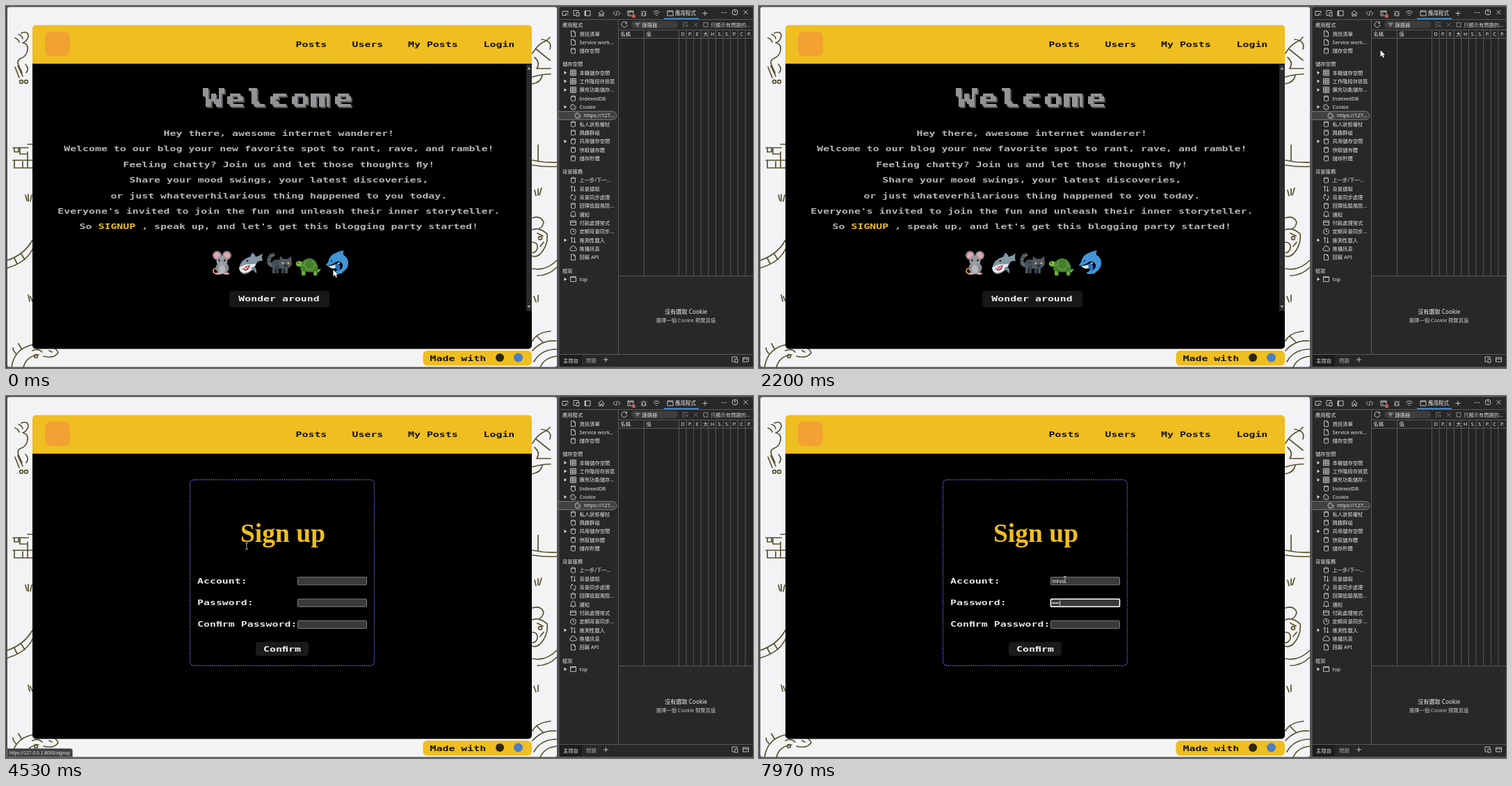
An HTML page with a canvas for the animation above (8000 ms loop, 1074 by 521 pixels).

```html
<!DOCTYPE html>
<html lang="zh-Hant">
<head>
<meta charset="utf-8">
<title>Blog sign up</title>
<style>
html, body { margin: 0; width: 100%; height: 100%; overflow: hidden; background: #555358; }
canvas { display: block; }
</style>
</head>
<body>
<canvas id="stage" width="1074" height="521"></canvas>
<script>
const ctx = document.getElementById('stage').getContext('2d');
const LOOP = 8000;
const UI = '"Noto Sans", "Noto Sans CJK TC", "Noto Sans CJK", sans-serif';
const MONO = '"DejaVu Sans Mono", monospace';
const ARIAL = '"Liberation Sans", sans-serif';
const ADVANCE = 8.96;
const YELLOW = '#efbe20';

// ---------- helpers ----------
function box(x, y, w, h, fill, r = 0, line, lw = 1) {
  ctx.beginPath();
  ctx.roundRect(x, y, w, h, r);
  if (fill) { ctx.fillStyle = fill; ctx.fill(); }
  if (line) { ctx.strokeStyle = line; ctx.lineWidth = lw; ctx.stroke(); }
}
function oval(x, y, rx, ry, fill) {
  ctx.beginPath();
  ctx.ellipse(x, y, rx, ry, 0, 0, 7);
  ctx.fillStyle = fill;
  ctx.fill();
}
function shape(d, fill) {
  ctx.fillStyle = fill;
  ctx.fill(new Path2D(d));
}
function line(d, color, lw = 1) {
  ctx.strokeStyle = color;
  ctx.lineWidth = lw;
  ctx.stroke(new Path2D(d));
}
function text(s, x, y, size, color, align = 'left', family = UI, weight = 'normal') {
  ctx.font = `${weight} ${size}px ${family}`;
  ctx.textAlign = align;
  ctx.fillStyle = color;
  ctx.fillText(s, x, y);
}
// Broad terminal-like lettering of the blog
function wide(s, x, y, color, align = 'left') {
  ctx.save();
  ctx.translate(x, y);
  ctx.scale(1.353, 1);
  text(s, 0, 0, 11, color, align, MONO, 'bold');
  ctx.restore();
}
// A word set on a coarse grid, eight cells per letter, for large blocky type
function blocky(s, color) {
  const tile = document.createElement('canvas');
  tile.width = s.length * 8;
  tile.height = 10;
  const g = tile.getContext('2d');
  g.font = `bold 9.4px ${MONO}`;
  g.fillStyle = color;
  [...s].forEach((c, i) => {
    g.setTransform(1.38, 0, 0, 1, i * 8, 7);
    g.fillText(c, 0, 0);
  });
  const img = g.getImageData(0, 0, tile.width, tile.height);
  for (let i = 3; i < img.data.length; i += 4) img.data[i] = img.data[i] > 115 ? 255 : 0;
  g.putImageData(img, 0, 0);
  return tile;
}

// ---------- page background ----------
const doodles = [
  'M13 46q5 2 6 6M18 41q5 1 6 6M22 39q10 -4 10 5q-2 7 -8 9q8 1 7 10q-1 9 -9 12q-7 3 -4 10l5 11',
  'M13 88l6 15M17 86l7 15M28 84q6 6 1 12',
  'M10 204h22M12 204v6h6v-6M20 204v9h11M10 222h28M12 222v11h12v-9M31 199h7M31 210v22M24 233h14',
  'M28 272l2 8M32 271v10M37 272l-2 9',
  'M2 377q27 -8 36 -27M2 366q24 -8 36 -29M12 363l4 8M22 357l5 8',
  'M32 416l2 9M35 418l3 7',
  'M8 520q4 -30 38 -34q24 1 29 13q-6 9 -21 5M25 520q4 -16 22 -18M14 500q-4 -4 -4 -8M22 493l-4 -7M38 496q8 -4 14 2M62 496l4 2',
  'M757 68q8 -14 20 -18l5 -5M762 62l20 16M770 48q16 2 12 14M757 102q14 -4 26 -4M757 112q12 -2 14 -12M760 74q9 8 3 16h20',
  'M757 222q18 4 35 3M757 229q18 3 35 2M765 200v22',
  'M760 265l2 8M765 263v9M770 262l-3 10',
  'M757 305q12 -4 16 6q-1 7 -6 9M757 322q10 -4 21 6q2 16 -10 29q-6 5 -11 3M757 340q8 0 7 9q-2 6 -7 6M764 327l8 4M773 340l-5 6',
  'M757 378q19 4 35 -12M764 388q16 0 28 -12',
  'M759 418l3 8M765 416v9',
  'M757 482q6 -12 26 -14M757 496q14 -16 34 -14M759 512q10 -18 33 -18M768 520q6 -14 24 -16M764 476l8 8'
].join('');

function backdrop() {
  box(0, 0, 1074, 521, '#555358');
  box(2, 1.5, 790, 518, '#f3f3f5', 3);
  ctx.lineCap = ctx.lineJoin = 'round';
  line(doodles, '#56532f', 1.7);
  for (const [x, y] of [[22, 109], [29, 109], [768, 334], [43, 504]]) {
    ctx.beginPath();
    ctx.arc(x, y, 2.4, 0, 7);
    ctx.stroke();
  }
  ctx.lineCap = 'butt';
}

function frame() {
  box(38, 83, 718, 410.5, '#000', [0, 0, 5, 5]);
  box(38, 27.5, 718, 55.5, YELLOW, [5, 5, 0, 0]);
  box(56, 37, 36, 35, '#f2a233', 8);
  wide('Posts', 416.5, 59, '#111');
  wide('Users', 497.5, 59, '#111');
  wide('My Posts', 578, 59, '#111');
  wide('Login', 686.5, 59, '#111');
  box(599.5, 496, 156.5, 21.5, YELLOW, 6);
  wide('Made with', 609.5, 510.5, '#111');
  oval(710, 506, 6, 6, '#2c2612');
  oval(736.5, 506, 6.5, 6.5, '#4d7fc4');
}

// ---------- animals ----------
function mouse() {
  line('M315 384q-17 4 -17 -3q1 -5 6 -2', '#dd9a5c', 1.8);
  oval(311, 377, 9.5, 9, '#858b91');
  for (const x of [303.5, 317.5]) {
    oval(x, 359, 6.5, 6.5, '#858b91');
    oval(x, 359, 4.3, 4.5, '#eda2ab');
  }
  oval(310.5, 367, 8, 8, '#969ba0');
  oval(310.5, 379, 5, 6, '#b4b8bb');
  for (const x of [306.5, 314.5]) oval(x, 366, 1.3, 1.6, '#222');
  oval(310.5, 371, 1.6, 1.2, '#e58d98');
  for (const x of [305, 317]) oval(x, 385, 4, 1.5, '#eda2ab');
}
function shark() {
  shape('M335 377q3 -13 16 -16l3 -6q4 2 5 6q5 -1 10 -5q-2 6 0 11q-5 -1 -8 2q-5 14 -18 17q-7 -1 -8 -9z', '#8296a3');
  shape('M335 377q9 -6 16 -5l8 -1q-5 12 -16 13q-6 0 -8 -7z', '#edf0f1');
  shape('M338 379q6 -5 13 -6q-1 7 -7 8z', '#a63c47');
  line('M339 378l2 2 2 -4 2 3 2 -4 2 2', '#fff', 1);
  oval(347, 367, 1.4, 1.4, '#17232b');
  shape('M352 377l8 8q1 -7 -3 -10z', '#72858f');
}
function cat() {
  ctx.lineCap = 'round';
  line('M385 374q-8 -1 -7 -9q2 -6 6 -7', '#5b656e', 5);
  ctx.lineCap = 'butt';
  line('M376 367h5M376.5 362h6M379 357h7', '#343b42', 1.5);
  box(382, 365, 22, 13, '#48525b', 6);
  for (const x of [383, 388, 396, 401]) box(x, 373, 4, 12, x % 2 ? '#48525b' : '#383f47', 1.5);
  shape('M393 372l1 -12 5 4h6l5 -4 1 12q-4 7 -10 6q-6 0 -8 -6z', '#4f5963');
  for (const x of [398, 406]) oval(x, 370, 1.5, 1.5, '#d6ba4c');
  oval(402, 374, 3, 2, '#2c333a');
  line('M386 366v5M390 366v6', '#343b42', 1);
}
function turtle() {
  oval(421.5, 371, 4.8, 4, '#78b843');
  shape('M420 371l7 9 5 -3 -6 -9z', '#78b843');
  for (const x of [425, 442]) box(x, 378, 5.5, 10, '#6cab3b', 2);
  shape('M446 380l7 -2 -4 6z', '#78b843');
  shape('M423 380q1 -16 13 -17q12 1 13 18q-13 5 -26 -1z', '#437f2c');
  line('M431 366l-2 6 3 7h8l4 -6 -3 -7M429 372l-5 2M444 373l4 2', '#6ea83c', 1.2);
  oval(420, 370, 0.9, 1, '#18240f');
}
function dolphin() {
  shape('M460 374q0 -3 3 -5q2 -11 12 -14q5 -3 11 -3q-2 3 -1 6q8 5 7 14q-1 7 -8 11q1 2 -9 3q-3 0 -5 -2q4 -1 6 -4q-1 -5 -5 -5q8 1 9 5q5 -3 4 -8q-3 -6 -9 -4q-6 5 -15 6z', '#4295d8');
  shape('M463 374q10 0 17 -6q-1 9 -9 10q-4 0 -8 -4z', '#d8ecf7');
  shape('M473 371q0 8 6 11q3 -5 0 -11z', '#2872ba');
  oval(468, 367, 1.2, 1.2, '#142f4e');
}

// ---------- pages ----------
const title = blocky('Welcome', '#949494');
const shade = blocky('Welcome', '#55555f');
const intro = [
  'Hey there, awesome internet wanderer!',
  'Welcome to our blog your new favorite spot to rant, rave, and ramble!',
  'Feeling chatty? Join us and let those thoughts \ufb02y!',
  'Share your mood swings, your latest discoveries,',
  'or just whateverhilarious thing happened to you today.',
  "Everyone's invited to join the fun and unleash their inner storyteller.",
  "So        , speak up, and let's get this blogging party started!"
];

function welcomePage() {
  const cell = 3.88;
  ctx.imageSmoothingEnabled = false;
  for (const [img, shift] of [[shade, 2], [title, 0]]) {
    ctx.drawImage(img, 283 + shift, 118 + shift, img.width * cell, img.height * cell);
  }
  intro.forEach((s, i) => wide(s, 392.3 - s.length * ADVANCE / 2, 187 + i * 22.4, '#b5b5b5'));
  wide('SIGNUP', 392.3 - 29 * ADVANCE, 321.4, YELLOW);
  mouse(); shark(); cat(); turtle(); dolphin();
  box(321, 410, 144, 23.5, '#171717', 4);
  wide('Wonder around', 392.5, 425.3, '#ececec', 'center');
  box(748, 84, 8, 355, '#2b2b2b');
  shape('M749.5 91.5h5l-2.5 -4zM749.5 431h5l-2.5 4z', '#a0a0a0');
}

const USER = 'mirvo';
const FOCUS = 5350, TYPE = 6350, TAB = 7250, SECRET = 7600;
const typed = (t, start, step, n) => Math.max(0, Math.min(n, Math.floor((t - start) / step) + 1));

function field(y, value, focused, caret) {
  const x = 419.5;
  box(x, y - 5.5, 99, 11, '#3a3a3a', 1, focused ? '#fff' : '#7d7d7d', focused ? 1.6 : 1);
  text(value, x + 2, y + 2.6, 7.2, '#f2f2f2', 'left', ARIAL);
  if (caret) box(x + 2.8 + ctx.measureText(value).width, y - 3.5, 0.8, 7.5, '#fff');
}

function signupPage(t) {
  ctx.setLineDash([1.5, 1.5]);
  box(264.5, 120.5, 265, 267.5, null, 6, '#6a66e0', 1.4);
  ctx.setLineDash([]);
  text('Sign up', 398, 210, 37.5, YELLOW, 'center', '"Liberation Serif", serif', 'bold');
  wide('Account:', 275, 270, '#e4e4e4');
  wide('Password:', 275, 301, '#e4e4e4');
  wide('Con\ufb01rm Password:', 275, 332.3, '#e4e4e4');

  const chars = typed(t, TYPE, 130, USER.length);
  const dots = typed(t, SECRET, 90, 4);
  const onName = t >= FOCUS && t < TAB, onPass = t >= TAB;
  const blink = t < FOCUS + 500 || t >= TYPE;
  field(266.3, USER.slice(0, chars), onName, onName && blink);
  field(297.7, '\u2022'.repeat(dots), onPass, onPass);
  field(329, '', false, false);
  box(359, 354, 76, 20, '#1a1a1a', 4);
  wide('Con\ufb01rm', 397, 367.8, '#f4f4f4', 'center');
}

function statusBar() {
  box(2, 507.5, 93.5, 12, '#404042', [0, 3, 0, 0], '#77777a', 0.8);
  text('https://127.0.0.1:8000/signup', 5, 516, 6.75, '#e0e0e0', 'left', ARIAL);
}

// ---------- developer tools ----------
// Icons in a box of 8 by 8 around the origin
const icons = {
  doc: 'M-3 -4h4l2 2v6h-6zM1 -4v2h2',
  db: 'M-3 -3q3 -2 6 0v6q-3 2 -6 0zM-3 -3q3 2 6 0',
  grid: 'M-4 -4h8v8h-8zM-4 -1.3h8M-4 1.3h8M-1.3 -4v8M1.3 -4v8',
  cookie: 'M0 -4a4 4 0 1 0 4 4q-2 0 -2 -2q-2 0 -2 -2M-2 -1h.8M-1 2h.8M1 1h.8',
  swap: 'M-2 4v-8l-2 2M-2 -4l2 2M2 -4v8l-2 -2M2 4l2 -2',
  sync: 'M-1 -4a4 4 0 0 0 -1 7M1 4a4 4 0 0 0 1 -7M-3 -4h2v2M3 4h-2v-2',
  bell: 'M-4 2.5l1 -2v-2a3 3 0 0 1 6 0v2l1 2zM-1 4h2',
  card: 'M-4 -3h8v6h-8zM-4 -1h8',
  clock: 'M4 0a4 4 0 1 1 -8 0a4 4 0 1 1 8 0M0 -2.5v2.5h2',
  cloud: 'M-2.5 3a2 2 0 0 1 -.5 -4a3 3 0 0 1 6 0a2 2 0 0 1 0 4z',
  frame: 'M-4 -3.5h8v7h-8zM-4 -2.5h8',
  inspect: 'M1 3h-5v-6h8v3M1 0l3 3M1 0v3',
  device: 'M-4 -1v-3h7v2M-4 -1v4h3M0 -1h4v5h-4z',
  dock: 'M-4 -3.5h8v7h-8zM-2.5 -3.5v7M-3.2 -3.5v7',
  home: 'M-4 0l4 -4 4 4M-3 -1v5h2v-3h2v3h2v-5',
  code: 'M-2 -3l-3 3 3 3M2 -3l3 3 -3 3M1 -3.5l-2 7',
  console: 'M-4 -3.5h8v7h-8zM-4 -2h8M-2 0l1.5 1 -1.5 1',
  bug: 'M-2 -1a2 2 0 0 1 4 0v3a2 2 0 0 1 -4 0zM-4 -3l2 2M4 -3l-2 2M-4 1h2M2 1h2M-4 4l2 -2M4 4l-2 -2',
  wifi: 'M-5 -1q5 -5 10 0M-3 1q3 -3 6 0M-1 3h2',
  plus: 'M-3.5 0h7M0 -3.5v7',
  close: 'M-3 -3l6 6M3 -3l-6 6',
  help: 'M4 0a4 4 0 1 1 -8 0a4 4 0 1 1 8 0M-1 -1q0 -1.5 1 -1.5q2 1 0 3M0 2v.6',
  reload: 'M3 -3a4 4 0 1 0 1 3M3.5 -4.5v2.5h-2.5',
  filter: 'M-3.5 -2h7M-2 0h4M-.8 2h1.6',
  clear: 'M-4 -3h8M-4 0h4M-4 3h3M1 0l3 3M4 0l-3 3',
  check: 'M-3 -3h6v6h-6z'
};
function icon(name, x, y, color = '#d0d0d0') {
  ctx.save();
  ctx.translate(x, y);
  line(icons[name], color, 0.9);
  ctx.restore();
}

// A row: label, icon, foldable. An empty icon marks a heading.
const groups = [
  [27.5, [['應用程式', ''], ['資訊清單', 'doc'], ['Service work...', 'doc'], ['儲存空間', 'db']]],
  [83.7, [['儲存空間', ''], ['本機儲存空間', 'grid', 1], ['工作階段存放區', 'grid', 1],
    ['擴充功能儲存...', 'grid', 1], ['IndexedDB', 'db'], ['Cookie', 'cookie', 1],
    ['https://127...', 'cookie'], ['私人狀態權杖', 'db'], ['興趣群組', 'db'],
    ['共用儲存空間', 'db', 1], ['快取儲存體', 'db'], ['儲存貯體', 'db']]],
  [238.3, [['背景服務', ''], ['上一步/下一...', 'db'], ['背景擷取', 'swap'], ['背景同步處理', 'sync'],
    ['回彈追蹤風險...', 'db'], ['通知', 'bell'], ['付款處理常式', 'card'], ['定期背景同步...', 'clock'],
    ['推測性載入', 'swap', 1], ['推播訊息', 'cloud'], ['回報 API', 'doc']]],
  [380.8, [['框架', ''], ['top', 'frame', 1]]]
];

function sidebar(mx, my) {
  for (const [top, rows] of groups) rows.forEach(([label, name, fold], i) => {
    const y = top + i * 12.33;
    const chosen = label.startsWith('https');
    const hover = name && mx > 796 && mx < 878 && Math.abs(my - y) < 6.2;
    if (chosen) box(794, y - 6, 84, 12, '#414143', [0, 6, 6, 0], '#858585', 0.9);
    else if (hover) box(796, y - 6, 82, 12, '#404042', [0, 6, 6, 0]);
    const shift = chosen ? 6.5 : 0;
    if (name) icon(name, 815.5 + shift, y);
    if (fold) shape(`M802.5 ${y - 2.5}v5l3.8 -2.5z`, '#d8d8d8');
    text(label, name ? 824.5 + shift : 800, y + 2.7, 7.3, '#e6e6e6');
  });
}

function devtools(mx, my) {
  box(795.5, 1.5, 280, 517.5, '#282828', 3);
  box(881, 47, 193, 341, '#242424');
  const tabs = { inspect: 804, device: 820, dock: 836, home: 856, code: 878, console: 898, bug: 917, wifi: 935, frame: 955, plus: 1005 };
  for (const name in tabs) icon(name, tabs[name], 10.5);
  oval(902.5, 14.5, 2.6, 2.6, '#d9534f');
  text('應用程式', 962, 13.3, 7.5, '#f0f0f0');
  box(946, 17.5, 50, 1.5, '#4a9be8');
  for (const x of [1029.5, 1032.5, 1035.5]) oval(x, 9.5, 0.7, 0.7, '#ddd');
  icon('help', 1048, 9);
  icon('close', 1063.5, 9);

  sidebar(mx, my);

  icon('reload', 889, 27);
  box(899, 21.5, 67, 10.5, '#3d3d3f', 5);
  icon('filter', 908, 27);
  text('篩選器', 914.5, 29.5, 7.3, '#d8d8d8');
  icon('clear', 976.5, 27, '#888');
  icon('close', 991.5, 27, '#777');
  icon('check', 1006, 27, '#999');
  text('只顯示有問題的...', 1013, 29.5, 7.3, '#d8d8d8');

  const rule = '#58585a';
  line('M796 19.5h278M880.5 20v481M881 34.5h193M881 46.5h193M881 388.5h193M796 501.5h278', rule, 1);
  text('名稱', 883.5, 43.2, 7.2, '#e4e4e4');
  text('值', 920.5, 43.2, 7.2, '#e4e4e4');
  line('M917.5 35v353', rule, 1);
  ['D', 'P.', 'E', '大', 'H', 'S.', 'S.', 'P.', 'C', 'P.'].forEach((s, i) => {
    const x = 967.5 + i * 10.6;
    line(`M${x} 35v353`, rule, 1);
    text(s, x + 3, 43.2, 7.2, '#e4e4e4');
  });

  text('沒有選取 Cookie', 977.5, 442.6, 8.2, '#f0f0f0', 'center');
  text('選擇一個 Cookie 預覽其值', 977.5, 454.8, 7.3, '#c8c8c8', 'center');

  box(796, 502, 32, 17, '#1d1d1f');
  text('主控台', 801, 513, 7.4, '#f0f0f0');
  text('問題', 834, 513, 7.4, '#a8a8a8');
  icon('plus', 862.5, 509);
  icon('device', 1048, 509);
  icon('card', 1063.5, 509);
}

// ---------- pointer ----------
const OPEN = 4100;
const path = [
  [0, 470.5, 379.5], [300, 470.5, 379.5], [1230, 839.5, 136.5], [2200, 893.5, 63.5], [2500, 893.5, 63.5],
  [3130, 175.5, 310.5], [4150, 175.5, 310.5], [4530, 346, 216], [5200, 440, 264], [LOOP, 440, 264]
];
function pointerAt(t) {
  const i = path.findIndex((p, k) => k && t <= p[0]);
  const [t0, x0, y0] = path[i - 1], [t1, x1, y1] = path[i];
  const u = (t - t0) / (t1 - t0), e = u * u * (3 - 2 * u);
  return [x0 + (x1 - x0) * e, y0 + (y1 - y0) * e];
}
function pointer(x, y, beam) {
  ctx.save();
  ctx.translate(x, y);
  if (beam) {
    line('M-2 -4.5h1.5l.5 .5 .5 -.5h1.5M0 -4v8M-2 4.5h1.5l.5 -.5 .5 .5h1.5', '#c8c8c8', 0.9);
  } else {
    const d = 'M0 0v9.5l2.2 -2 1.6 3.5 1.7 -.8 -1.6 -3.3h3z';
    line(d, '#000', 1.2);
    shape(d, '#fff');
  }
  ctx.restore();
}

function draw(now) {
  const t = now % LOOP;
  const [x, y] = pointerAt(t);
  backdrop();
  frame();
  if (t < OPEN) welcomePage(); else signupPage(t);
  if (t > 3500 && t < 4900) statusBar();
  devtools(x, y);
  pointer(x, y, t >= OPEN + 50);
  requestAnimationFrame(draw);
}
requestAnimationFrame(draw);
</script>
</body>
</html>
```
